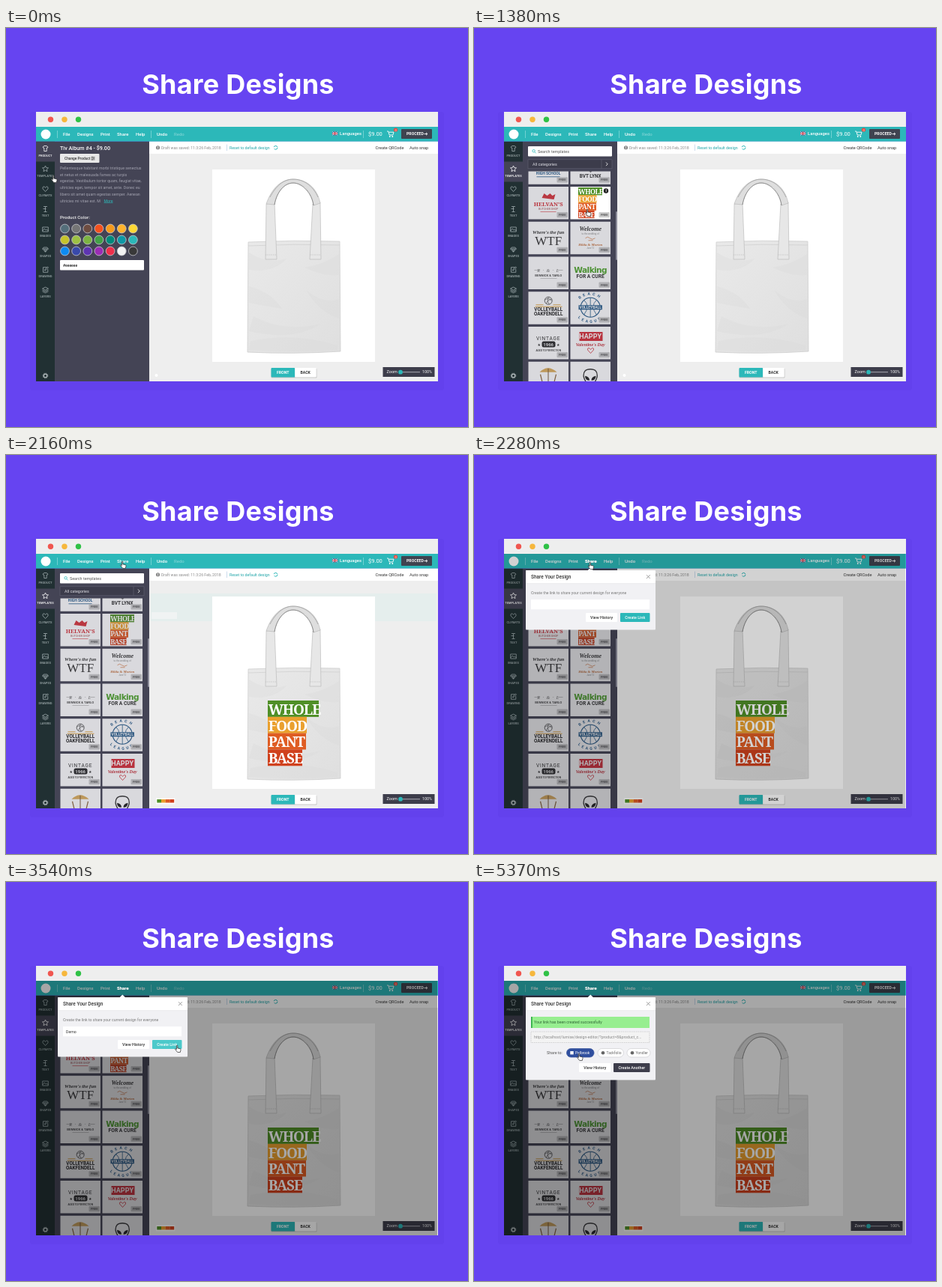
Write an HTML page that moves like this. It is 616 px wide and 533 px high and loops after 5400 ms.

```html
<!DOCTYPE html>
<html lang="en">
<head>
<meta charset="utf-8">
<title>Share Designs</title>
<style>
html, body { margin: 0; width: 100%; height: 100%; overflow: hidden; background: #6644f1; }
svg { display: block; width: 616px; height: 533px; font-family: Roboto, sans-serif; }
</style>
</head>
<body>
<svg id="stage" viewBox="0 0 616 533" xmlns="http://www.w3.org/2000/svg"></svg>
<script>
const LOOP = 5400, STEP = 30;
const TEAL = '#2cb8b9', PANEL = '#444455', INK = '#333';
const SERIF = 'font-family="Noto Serif, serif"';
const ITALIC = 'font-family="Liberation Serif, serif" font-style="italic"';
const BOLD = 'font-weight="700"', MED = 'font-weight="500"', MID = 'text-anchor="middle"';

const esc = s => s.replace(/&/g, '&amp;');
const rect = (x, y, w, h, fill, more = '') => `<rect x="${x}" y="${y}" width="${w}" height="${h}" fill="${fill}" ${more}/>`;
const disc = (x, y, r, fill, more = '') => `<circle cx="${x}" cy="${y}" r="${r}" fill="${fill}" ${more}/>`;
const line = (d, stroke, w = 0.8, more = '') => `<path d="${d}" fill="none" stroke="${stroke}" stroke-width="${w}" ${more}/>`;
const shape = (d, fill, more = '') => `<path d="${d}" fill="${fill}" ${more}/>`;
const text = (x, y, size, s, fill, more = '') => `<text x="${x}" y="${y}" font-size="${size}" fill="${fill}" ${more}>${esc(s)}</text>`;
const group = (id, s) => `<g id="${id}">${s}</g>`;
const at = (x, y, s, k = 1) => `<g transform="translate(${x} ${y}) scale(${k})">${s}</g>`;
const mid = (y, size, s, fill, more = '') => text(26.7, y, size, s, fill, `${MID} ${more}`);

// Four-line slab artwork, used on the bag and in its thumbnail
const artwork = [['WHOLE', 68, '#4f8f27'], ['FOOD', 52, '#eaa02e'], ['PANT', 51, '#df5c23'], ['BASE', 46, '#d0411d']]
  .map(([s, w, c], i) => rect(0, i * 21.8, w, 21.9, c) +
    text(0.7, i * 21.8 + 18.8, 19, s, '#fff', `${SERIF} ${BOLD} letter-spacing="-1.25"`)).join('');

function beachLeague() {
  const blue = '#285d8c';
  const word = (id, s) => `<text font-size="5" fill="${blue}" ${BOLD} letter-spacing="3" ${MID}><textPath href="#${id}" startOffset="50%">${s}</textPath></text>`;
  return line('M8 21a18.5 16.5 0 0 1 37 0', 'none', 1, 'id="arcTop"') + line('M5.5 23a21 18.5 0 0 0 42 0', 'none', 1, 'id="arcLow"') +
    word('arcTop', 'BEACH') + word('arcLow', 'LEAGUE') +
    disc(26.7, 21, 13, 'none', `stroke="${blue}" stroke-width="1.2"`) +
    line('M26.7 8v26M18 11q9 8 0 20M35 11q-9 8 0 20', blue, 0.8) +
    rect(11, 18, 31.4, 6, blue) + mid(22.8, 4.9, 'VOLLEYBALL', '#fff', BOLD);
}

const tiles = [
  [mid(31, 5, 'HIGH SCHOOL', '#285d8c', BOLD) + shape('M20 6h13v10q-6 8-13 0z', '#285d8c') + line('M11 33.5h31', '#285d8c'),
   mid(35, 6.4, 'BVT LYNX', '#333', BOLD) + shape('M17 7l5 4h9l5-4-2 13-7 8-8-8z', '#777')],
  [shape('M18 15l3-6 4 3 4-3 3 3 4-2-2 7z', '#d8363d') + mid(26, 7.6, "HELVAN'S", '#d8363d', `${SERIF} ${BOLD}`) +
     mid(31, 3.6, 'BUTCHER SHOP', '#a55') + line('M16 33.5h21', '#d8363d', 0.6),
   at(10.5, 1, artwork, 0.47)],
  [mid(16, 6.4, "Where's the fun", '#333', `${ITALIC} ${BOLD}`) + mid(31, 17, 'WTF', '#333', 'font-family="Liberation Serif, serif"'),
   mid(12, 8, 'Welcome', '#333', `${ITALIC} ${BOLD}`) + mid(17.5, 3, 'to the wedding of', '#888') +
     line('M20 22q3-3 6 0t7 0M24 25h6', '#d98a5a', 0.8) + mid(32, 4.8, 'Hilda & Morten', '#c4703c', `${ITALIC} ${BOLD}`) +
     mid(36, 2.8, 'June 12', '#888')],
  [mid(20, 6, 'R · & · L', '#666', `${ITALIC} letter-spacing="1"`) + line('M8 18h7M39 18h7', '#888', 0.5) +
     mid(26, 4.3, 'BENNICK & TARLO', '#333', MED) + line('M16 29h22', '#999', 0.5),
   mid(21, 10.6, 'Walking', '#4fa52d', 'font-family="DejaVu Sans, sans-serif" font-weight="700" letter-spacing="-.6"') +
     mid(28.5, 6.7, 'FOR A CURE', '#333', BOLD)],
  [disc(26.7, 12, 5, 'none', 'stroke="#555" stroke-width=".9"') + line('M22 11q5-4 9 1M24 16q1-5 7-6M27 7q-3 5 1 10', '#555', 0.7) +
     line('M10 17.5h10M33 17.5h10M9 20h36', '#e0a33a', 0.9) + mid(26, 6.3, 'VOLLEYBALL', '#222', BOLD) + mid(31.7, 6.3, 'OAKFENDELL', '#222', BOLD),
   beachLeague()],
  [mid(17.5, 6.6, 'VINTAGE', '#333', 'letter-spacing=".8"') + rect(18, 19.5, 18, 8, '#2b2b2b', 'rx="2.5"') +
     mid(25.7, 6, '1966', '#eee', BOLD) + text(12, 25.5, 5, '★', '#333') + text(37.5, 25.5, 5, '★', '#333') +
     mid(32.5, 3.3, 'AGED TO PERFECTION', '#333', MED),
   rect(12, 7, 31, 12, '#d5303a') + mid(16.2, 9, 'HAPPY', '#fff', BOLD) + mid(26, 6, "Valentine's Day", '#c7303a', `${ITALIC} ${BOLD}`) +
     line('M27 35.5l-4-4.5q-.4-3 2.2-2.5l1.8 2 2-2q2.6-.3 2 2.5z', '#d5303a', 0.8)],
  [shape('M15 14q11-11 23 0z', '#dcae5d') + line('M26.5 9v22', '#7c5c3c', 1) + rect(13, 27, 28, 2, '#b58a4f') +
     line('M16 17l3 12M37 17l-3 12M16 29l-2 6M21 29l1 6M32 29l-1 6M38 29l2 6', '#8c673f', 1.2),
   shape('M26.7 10q10 0 9 10-2 8-9 13-7-5-9-13-1-10 9-10z', 'none', 'stroke="#333" stroke-width="1.3"') +
     shape('M19.5 19q6 1 6 6-6 0-6-6zM34 19q-6 1-6 6 6 0 6-6z', '#222') + line('M25 30h3.5', '#333', 0.7)]
];

const PITCH = 46.75, SCROLL = 261.5, ROWS = 12;
function tileList() {
  let s = '';
  for (let r = 0; r < ROWS; r++) {
    tiles[(r + 2) % 7].forEach((art, col) => {
      const hot = r === 6 && col === 1;
      const free = rect(38, 34, 14.5, 7.2, '#ccc', 'rx="1"') + text(40.5, 39.2, 4.2, 'FREE', '#555', BOLD);
      const info = hot ? group('info', disc(47.5, 5.5, 3.2, '#222') + text(46.9, 7.4, 5, 'i', '#fff', BOLD)) : '';
      s += `<g ${hot ? 'id="hotTile"' : ''} opacity=".8" transform="translate(${72.5 + col * 56} ${193 + r * PITCH})">` +
        rect(0, 0, 53.5, 43.5, '#fff') + art + free + info + '</g>';
    });
  }
  return s;
}

function topBar() {
  const items = [[76, 'File'], [95, 'Designs'], [126, 'Print'], [148, 'Share'], [173, 'Help'], [201, 'Undo']];
  return rect(40, 132, 536, 19.5, TEAL) + disc(53, 142, 6.5, '#fff') +
    line('M68.5 137v10M193.5 137v10M476.5 137v10', '#8fdcdc', 0.7) +
    items.map(([x, s]) => text(x, 143.6, 6, s, '#fff', MED)).join('') + text(224, 143.6, 6, 'Redo', '#fff', 'opacity=".45"') +
    rect(435, 138.5, 7.2, 4.8, '#28407c') + line('M435 138.5l7.2 4.8M442.2 138.5l-7.2 4.8', '#fff', 0.8) +
    line('M438.6 138.5v4.8M435 140.9h7.2', '#fff', 1.7) + line('M438.6 138.5v4.8M435 140.9h7.2', '#d3303c', 1) +
    text(445, 143, 5.9, 'Languages', '#fff', MED) + text(483, 144.4, 7.5, '$9.00', '#fff') +
    line('M508 138h1.8l1.4 5h4.6l1.2-3.8h-6.4', '#fff', 0.9) + disc(511.7, 145, 0.9, '#fff') + disc(515.3, 145, 0.9, '#fff') +
    disc(519.5, 136, 2.6, '#e2483f') + text(518.4, 137.5, 4, '0', '#fff') +
    rect(527, 135, 41, 13, '#3f4350', 'rx="1"') + text(534, 143.4, 5.2, 'PROCEED', '#fff', BOLD) +
    line('M557.5 141.5h4.3M560 139.7l1.9 1.8-1.9 1.8', '#fff', 0.9);
}

function sideBar() {
  const icons = {
    PRODUCT: 'M-3.5-2l2-1.5h3l2 1.5-1 1.5-.8-.4v4.4h-3.4v-4.4l-.8.4z',
    TEMPLATES: 'M0-4l1.2 2.6 2.8.3-2.1 1.9.6 2.8L0 2.2l-2.5 1.4.6-2.8-2.1-1.9 2.8-.3z',
    CLIPARTS: 'M0 3.5l-3.5-3.7q-.5-3 1.7-3.1L0-1.7l1.8-1.6q2.2.1 1.7 3.1z',
    TEXT: 'M-2.5-3.5h5M0-3.5v7M-3-.5h4M-2 3.5h4',
    IMAGES: 'M-3.8-3h7.6v6h-7.6zM-3.8 2l2.5-3 2 2 1.3-1 1.8 2',
    SHAPES: 'M-2.3-3h4.6l1.5 2L0 3.2-3.8-1zM-3.8-1h7.6M-1.3-1L0 3.2 1.3-1',
    DRAWING: 'M2-3.3h-5v6.6h6.3v-4M-1 1l.5-1.7 3.5-3.3 1 1-3.5 3.5z',
    LAYERS: 'M0-3.8l4 2-4 2-4-2zM-4 0l4 2 4-2M-4 1.8l4 2 4-2'
  };
  return rect(40, 151.5, 25, 320.5, '#213033') + rect(40, 151.5, 25, 27, PANEL, 'id="tab"') +
    Object.entries(icons).map(([name, d], i) => `<g class="nav">` + at(52.5, 161 + i * 27, line(d, 'currentColor', 0.8)) +
      text(52.5, 171.6 + i * 26.9, 4, name, 'currentColor', `${MID} ${MED}`) + '</g>').join('') +
    disc(52.5, 464.5, 2.3, 'none', 'stroke="#aab3b5" stroke-width="1.4"') +
    disc(52.5, 464.5, 3.4, 'none', 'stroke="#aab3b5" stroke-width=".8" stroke-dasharray="1.3 1.37"');
}

function productPanel() {
  const copy = ['Pellentesque habitant morbi tristique senectus', 'et netus et malesuada fames ac turpis',
    'egestas. Vestibulum tortor quam, feugiat vitae,', 'ultricies eget, tempor sit amet, ante. Donec eu',
    'libero sit amet quam egestas semper. Aenean', 'ultricies mi vitae est. M'];
  const hues = ('546e7a 757575 6d4c41 f4511e f59a1c ffb32c fdd835 c6c32a 9dc044 7cb342 43a047 00897b 0f97a5 2cb8b9 ' +
    '0d8bf2 3949ab 5e35b1 9a2db5 ee2f4c f2f2f2 393939').split(' ');
  return text(72, 162.5, 7.2, 'Tiv Album #4 - $9.00', '#fff', MED) +
    rect(72, 168, 52.5, 12, '#e8e8e8', 'rx="1"') + text(78, 175.8, 4.8, 'Change Product', INK, MED) +
    line('M113.5 172.5h5M113.5 174.2h5M113.5 175.9h5M115 171.7v1.6M117 173.4v1.6M115 175.1v1.6', INK, 0.6) +
    copy.map((s, i) => text(72, 189 + i * 8.7, 5.25, s, '#a3a3b0')).join('') +
    text(130.5, 232.5, 5.25, 'More', TEAL, 'text-decoration="underline"') +
    text(72, 255, 6.2, 'Product Color:', '#eee', MED) +
    hues.map((c, i) => disc(78.5 + i % 7 * 15.15, 268 + Math.floor(i / 7) * 15, 5.9, '#' + c, 'stroke="#c9c9d0" stroke-width=".8"')).join('') +
    rect(72, 310, 112, 13.5, '#fff', 'rx="1"') + text(76, 318.8, 5, '#eeeeee', '#222', MED);
}

function templatePanel() {
  return `<g clip-path="url(#listClip)">${group('list', tileList())}</g>` +
    rect(72, 158, 112, 13.5, '#fff', 'rx="1"') + disc(79.6, 164.2, 1.7, 'none', `stroke="${TEAL}" stroke-width=".8"`) +
    line('M80.8 165.4l1.9 1.9', TEAL, 0.8) + text(85, 166.6, 5.4, 'Search templates', '#555') +
    rect(72, 175.8, 112, 12, '#3c3c4b', 'stroke="#626273" stroke-width=".6"') + text(78, 183.6, 5.4, 'All categories', '#e0e0e6') +
    line('M170 175.8v12', '#626273', 0.6) + line('M176 179.5l2.2 2.3-2.2 2.3', '#eee', 0.9) +
    rect(189, 192, 2, 65, '#8d8d9b', 'id="thumb" rx="1"');
}

function bag() {
  const edge = 'stroke="#b4b4b4" stroke-width=".6"';
  return shape('M323 286Q384 283 445 285L446 432Q384 436 322 433Z', 'url(#cloth)', 'stroke="#cfcfcf" stroke-width=".8"') +
    shape('M324 300q25 16 50 8-18 20-50 15zM324 345q30 8 44 30-25-4-44-8zM398 320q25-4 46-18v28q-22 2-46-10zM330 385q40 22 90 10-35 24-96 10zM400 350q24 20 44 12v26q-26-8-44-38zM326 418q60-12 116 6v6q-60 4-118 0z', '#d6d6d6', 'opacity=".3"') +
    line('M323 291Q384 288 445 290', '#cacaca', 0.6) +
    shape('M346 309L347 235L358 233L361 309ZM405 309L409 235L419 233L420 309Z', '#e7e7e7', edge) +
    shape('M347 235C354 215 366 202 383 202C401 202 415 214 419 234L410 237C408 221 398 207 383 207C371 207 361 219 358 236Z', '#dedede', edge) +
    line('M358 236C361 219 371 207 383 207S408 221 410 237', '#858585', 0.9) + line('M352 226C360 211 370 202 383 202S409 210 416 226', '#9a9a9a', 0.7) +
    line('M346 303h15M405 303h15', '#b5b5b5', 0.6, 'stroke-dasharray="1.5 1"');
}

function workArea() {
  const swatch = ['#4f8f27', '#eaa02e', '#df5c23', '#d0411d'].map((c, i) => rect(201.3 + i * 5.7, 460, 5.8, 4.5, c)).join('');
  return rect(191, 151.5, 385, 320.5, '#eee') + rect(191, 151.5, 385, 16.5, '#fff') +
    group('band', rect(193, 185, 381, 37, '#e5eeed') + rect(194, 210, 34, 9, '#f0f3f3')) +
    disc(202.5, 159.8, 2.6, '#8a8a8a') + line('M202.5 158.2v2.2M202.5 161v.8', '#fff', 0.7) +
    text(207, 161.7, 5.15, 'Draft was saved: 11:3:26 Feb, 2018', '#888') + line('M294.5 155.5v8.5', '#9bd', 0.5) +
    text(298, 161.7, 5.25, 'Reset to default design', '#1fa5a8') +
    disc(359.5, 159.8, 2.4, 'none', `stroke="${TEAL}" stroke-width="1" stroke-dasharray="5.5 2"`) +
    text(492.5, 162, 5.6, 'Create QRCode', INK) + text(538, 162, 5.6, 'Auto snap', INK) +
    rect(275, 189, 217, 257, '#fff') + bag() + group('design', at(349, 328, artwork)) +
    group('dot', disc(200.5, 464, 2, '#fff')) + group('swatch', rect(200, 458.3, 25.3, 8, '#fff') + swatch) +
    rect(353.5, 455, 61, 12.5, '#c9c9c9', 'rx="1"') + rect(353.5, 454, 31.7, 12.5, TEAL, 'rx="1"') + rect(385.2, 454, 28.5, 12.5, '#fff', 'rx="1"') +
    text(369.2, 462.1, 5.2, 'FRONT', '#fff', `${MID} ${BOLD}`) + text(399.2, 462.1, 5.2, 'BACK', INK, `${MID} ${BOLD}`) +
    rect(502.5, 453, 69, 13, '#3d3d4b') + text(507.5, 461.3, 5.5, 'Zoom', '#fff') + line('M526 459.7h26', '#a9a9b3', 1) +
    disc(526, 459.7, 2.9, TEAL) + text(555, 461.3, 5.4, '100%', '#fff');
}

function dialog(h) {
  return rect(69, 154, 173, h, '#f1f1f4', 'rx="1"') + rect(69, 154, 173, 17.5, '#fff', 'rx="1"') +
    line('M69 171.7h173', '#dedee2', 0.5) + shape('M151.5 154.2l3.8-3.7 3.8 3.7z', '#fff') +
    text(76, 165, 6.5, 'Share Your Design', INK, MED) + line('M230 160.2l4.8 4.8M234.8 160.2l-4.8 4.8', '#777', 0.7);
}
const button = (x, y, w, s, fill, ink, more = '') => rect(x, y, w, 12, fill, `rx="1" ${more}`) +
  text(x + w / 2, y + 7.9, 5.3, s, ink, `${MID} ${MED}`);

function shareForm() {
  return dialog(79.5) + text(76, 186, 5.15, 'Create the link to share your current design for everyone', '#777') +
    rect(76, 193, 158, 13.2, '#fff', 'id="field"') + text(80, 201.5, 5.2, '', INK, 'id="typed"') +
    button(149, 211, 42, 'View History', '#fff', INK) + button(195, 211, 39.5, 'Create Link', TEAL, '#fff', 'id="create"');
}

const pills = [[123.5, 36.5, 'Palbrook', '#304f9e'], [165, 34.5, 'Tackfolio', '#e4484d'], [204, 31, 'Yondler', '#2aa7ee']];
function shareResult() {
  const pill = ([x, w, s, c], i) => {
    const face = (bg, ink, edge) => rect(x, 222.5, w, 11.5, bg, `rx="5.7" stroke="${edge}" stroke-width=".6"`) +
      (i ? disc(x + 7, 228.2, 2.3, ink) : rect(x + 4.8, 226, 4.4, 4.4, ink)) + text(x + 11.5, 230, 4.9, s, ink);
    return face('#fff', '#666', '#c8c8cc') + group('hot' + i, face(c, '#fff', c));
  };
  return dialog(110.5) + rect(76, 180, 158, 15, '#97ee90') + rect(76, 180, 1.8, 15, '#35b04a') +
    text(80, 189.4, 5.2, 'Your link has been created successfully', '#2f6636') +
    rect(76, 200, 158, 14.5, '#f3f3f3', 'stroke="#bbb" stroke-width=".6" stroke-dasharray="1.5 1"') +
    text(80, 209.2, 5.2, 'http://localhost/lumise/design-editor/?product=8&product_c...', '#888') +
    text(97, 230, 5.3, 'Share to:', '#555') + pills.map(pill).join('') +
    button(140, 242, 42.5, 'View History', '#fff', INK) + button(186, 242, 48.5, 'Create Another', '#3d3d4b', '#fff');
}

const hand = shape('M-.6.5Q0-.6.8.5V4l3.4.7q1 .4.8 1.7L4.3 9.4H.7L-2.3 5.7q-.3-1.2.8-.9l.9.9z', '#fff', 'stroke="#222" stroke-width=".7"');
const beam = line('M-1.5-3h3M0-3v6M-1.5 3h3', '#333', 0.8);

document.getElementById('stage').innerHTML =
  `<defs><clipPath id="listClip"><rect x="65" y="191.5" width="126" height="280.5"/></clipPath>
  <linearGradient id="cloth" x1="0" x2="1" y1="0" y2="1"><stop offset="0" stop-color="#e9e9e9"/><stop offset=".5" stop-color="#e4e4e4"/><stop offset="1" stop-color="#dfdfdf"/></linearGradient></defs>` +
  rect(0, 0, 616, 533, '#6644f1') + rect(32, 112, 552, 372, '#5a38e0', 'opacity=".25" rx="4"') +
  text(309.5, 88, 36, 'Share Designs', '#fff', `${MID} font-family="Inter, sans-serif" font-weight="700" letter-spacing=".25"`) +
  rect(40, 112, 536, 20, '#eee') + disc(59.5, 122.3, 3.7, '#f0564f') + disc(78, 122.3, 3.7, '#f6b73c') + disc(96.5, 122.3, 3.7, '#2fc146') +
  workArea() + rect(65, 151.5, 126, 320.5, PANEL) + group('product', productPanel()) + group('templates', templatePanel()) +
  sideBar() + topBar() + rect(40, 132, 535, 340, '#000', 'id="shade"') +
  group('form', shareForm()) + group('result', shareResult()) + text(148, 143.6, 6, 'Share', '#fff', `id="active" ${BOLD}`) +
  group('cursor', group('hand', hand) + group('beam', beam));

const ui = {};
document.querySelectorAll('#stage [id]').forEach(el => ui[el.id] = el);
const navs = document.querySelectorAll('.nav');

const ramp = (t, a, b) => Math.min(1, Math.max(0, (t - a) / (b - a)));
const ease = k => k * k * (3 - 2 * k);
const show = (id, on) => ui[id].setAttribute('display', on ? 'inline' : 'none');
const set = (id, key, value) => ui[id].setAttribute(key, value);

// time, x, y of the pointer tip
const track = [[0, 63, 197], [60, 58, 192], [210, 58, 192], [570, 158, 300], [1140, 158, 300], [1320, 151, 242], [1710, 151, 242],
  [2010, 155, 142], [2250, 155, 142], [2580, 139, 196], [3090, 139, 196], [3480, 228, 218], [3840, 228, 218],
  [4260, 218, 229], [4320, 218, 229], [4440, 186, 229], [4770, 186, 229], [4920, 140, 229], [LOOP, 140, 229]];
function pointer(t) {
  const i = track.findIndex(p => p[0] > t);
  const [a, x, y] = track[i - 1], [b, u, v] = track[i], k = ease(ramp(t, a, b));
  return [x + (u - x) * k, y + (v - y) * k];
}

function draw(t) {
  const browsing = t >= 180, added = t >= 1560, sharing = t >= 2250, made = t >= 3750;
  show('product', !browsing);
  show('templates', browsing);
  set('tab', 'y', browsing ? 178.5 : 151.5);
  navs.forEach((el, i) => el.setAttribute('color', i === +browsing ? '#fff' : '#9eaaac'));

  const k = ease(ramp(t, 600, 1140));
  set('list', 'transform', `translate(0 ${-SCROLL * k})`);
  set('thumb', 'y', 192 + 53 * k);
  const hover = t >= 1230 && t < 1800;
  set('hotTile', 'opacity', hover ? 1 : 0.8);
  show('info', hover);

  show('design', added);
  show('swatch', added);
  show('dot', !added);
  show('band', t >= 1710 && t < 2190);

  set('shade', 'opacity', 0.35 * ramp(t, 2220, 2340));
  show('active', sharing);
  show('form', sharing && !made);
  show('result', made);

  const focus = t >= 2610 && t < 3150;
  const count = t < 2730 ? 0 : Math.min(4, 1 + Math.floor((t - 2730) / 60));
  ui.typed.textContent = 'Demo'.slice(0, count) + (focus ? '|' : '');
  set('field', 'fill', focus ? '#fdfde6' : '#fff');
  set('create', 'fill', t >= 3450 ? '#4cc9ca' : TEAL);

  set('hot0', 'opacity', ramp(t, 4830, 4930));
  set('hot1', 'opacity', ramp(t, 4350, 4450) - ramp(t, 4800, 4900));
  set('hot2', 'opacity', ramp(t, 4220, 4300) - ramp(t, 4350, 4500));

  const [x, y] = pointer(t);
  const typing = t >= 2520 && t < 3210;
  set('cursor', 'transform', `translate(${x} ${y})`);
  show('hand', !typing);
  show('beam', typing);
}

const start = performance.now();
function tick() {
  const t = (performance.now() - start) % LOOP;
  draw(Math.floor(t / STEP) * STEP);
  requestAnimationFrame(tick);
}
tick();
</script>
</body>
</html>
```
